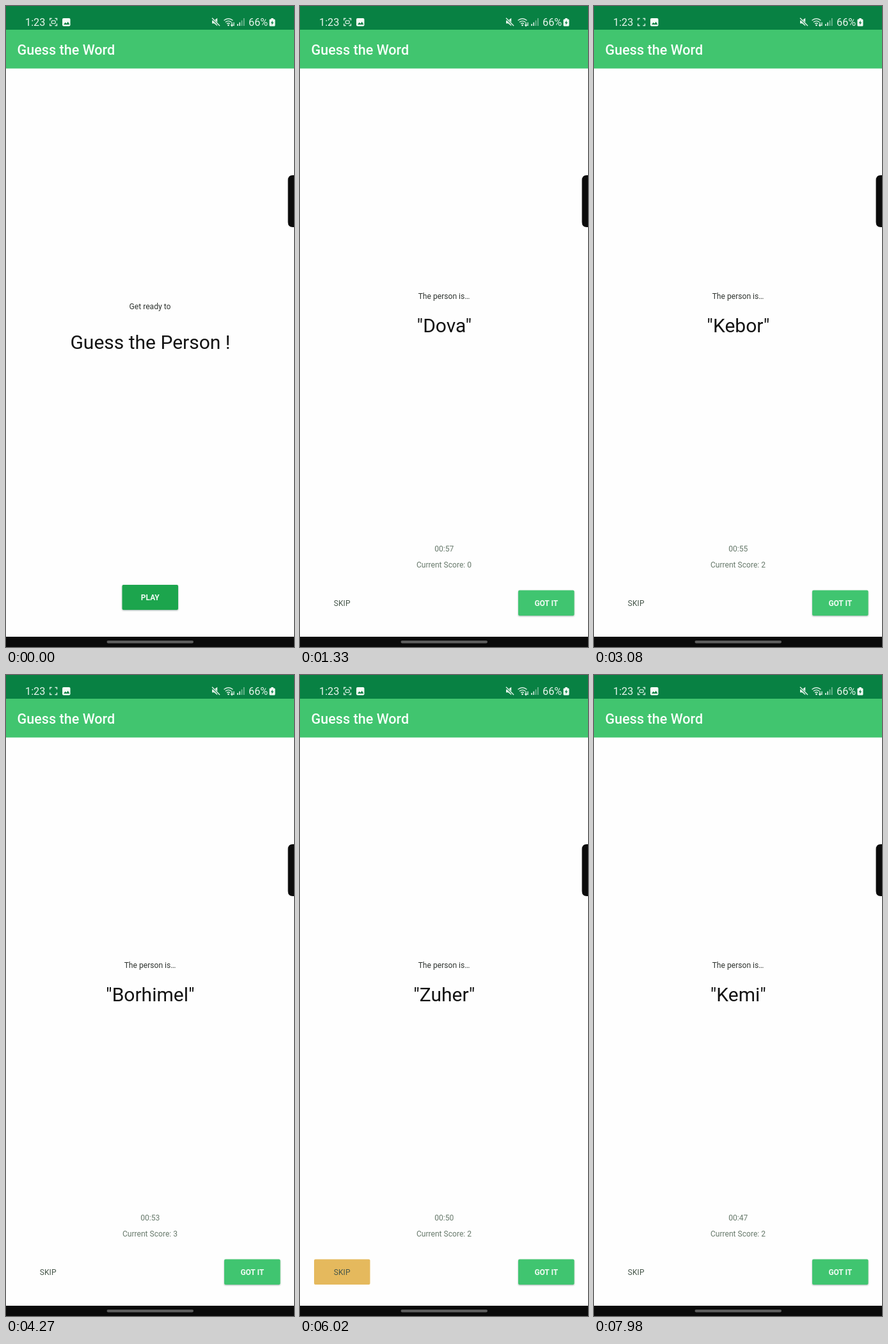
An HTML page that plays this animation: 450 by 1000 pixels, repeating every 8 s.

```html
<!DOCTYPE html>
<html lang="en">
<head>
<meta charset="utf-8">
<title>Guess the Word</title>
<style>
  html, body { margin: 0; width: 100%; height: 100%; overflow: hidden; background: #fefefe; }
  svg { display: block; width: 100%; height: 100%; font-family: Roboto, sans-serif; }
  .mid { text-anchor: middle; }
  .small { font-size: 12.1px; fill: #2e332f; }
  .big { font-size: 30px; fill: #131313; }
  .info { fill: #687a6c; }
  .label { font-size: 12px; font-weight: 700; fill: #effaf2; }
  .status { font-size: 16.3px; fill: #e6f4eb; }
  .line { fill: none; stroke: #d9efe2; }
</style>
</head>
<body>
<svg viewBox="0 0 450 1000">
  <defs>
    <filter id="shadow" x="-10%" y="-10%" width="120%" height="130%">
      <feDropShadow dx="0" dy="1" stdDeviation="0.8" flood-color="#103a20" flood-opacity=".4"/>
    </filter>
  </defs>
  <rect width="450" height="1000" fill="#fefefe"/>
  <rect width="450" height="38" fill="#088143"/>
  <rect y="37" width="450" height="60.5" fill="#41c56f"/>
  <text x="17.5" y="76" font-size="21.6" font-weight="500" fill="#f8fffa">Guess the Word</text>

  <!-- status bar -->
  <text class="status" x="30" y="30.5">1:23</text>
  <path class="line" stroke-width="1.4" d="M68.7 22.5v-3h3M76.5 19.5h3v3M79.5 27.5v3h-3M71.7 30.5h-3v-3"/>
  <g id="recording" class="line" stroke-width="1.3">
    <rect x="71.2" y="22.8" width="6" height="4.6" rx="1.5"/>
  </g>
  <rect x="88" y="19" width="12.5" height="12.5" rx="2" fill="#f2fbf5"/>
  <path d="M90 29l2.7-3.6 1.9 2 2.2-3 2.6 4.6z" fill="#088143"/>
  <path d="M322 22.5h3.2l5-3.8v12.5l-5-4H322z" fill="#e6f4eb"/>
  <path d="M321.5 18.5l12 12.5" stroke="#088143" stroke-width="3"/>
  <path class="line" stroke-width="1.5" d="M322 18.7l12 12.3"/>
  <path class="line" stroke-width="1.4" d="M340.5 22.5q7-5.6 14 0M342.8 25.2q4.8-3.6 9.4 0M345 27.8q2.6-2 5 0M353 25.5v5.5M351.3 29.3l1.7 2 1.7-2M356 31v-5.5"/>
  <circle cx="347.5" cy="30" r="1.3" fill="#e6f4eb"/>
  <path class="line" stroke-width="1.7" d="M362 31v-3M365.2 31v-5.5"/>
  <path class="line" stroke-width="1.7" opacity=".5" d="M368.5 31v-8.5M371.8 31v-12"/>
  <text class="status" x="379" y="30.5">66%</text>
  <path d="M414.3 19h3.4v1.6h1.3q1.5 0 1.5 1.5v8q0 1.5-1.5 1.5h-6q-1.5 0-1.5-1.5v-8q0-1.5 1.5-1.5h1.3z" fill="#f2fbf5"/>
  <path d="M416.7 22.5l-3 4.2h2l-.5 3 3.2-4.2h-2z" fill="#088143"/>

  <g id="titleScreen" class="mid">
    <text class="small" x="225" y="473">Get ready to</text>
    <text class="big" x="225.5" y="534.5">Guess the Person !</text>
    <rect x="181.5" y="903" width="87.5" height="39" rx="2" fill="#1ea54d" filter="url(#shadow)"/>
    <text class="label" x="225.3" y="927.3">PLAY</text>
  </g>

  <g id="gameScreen" class="mid">
    <text class="small" x="225" y="457">The person is…</text>
    <text class="big" id="word" x="225.3" y="509"></text>
    <text class="small info" id="timer" x="225.3" y="850.5"></text>
    <text class="small info" id="score" x="225" y="875.5"></text>
    <rect id="skip" x="22" y="911.5" width="87.5" height="39.5" rx="2" fill="#e5b95d"/>
    <text class="small" x="65.7" y="936" style="fill:#46564a">SKIP</text>
    <rect id="got" x="341" y="911.5" width="87.5" height="39.5" rx="2" filter="url(#shadow)"/>
    <text class="label" x="384.8" y="936">GOT IT</text>
  </g>

  <path d="M450 264h-2q-7.5 0-7.5 8v65q0 8 7.5 8h2z" fill="#0b0b0b"/>
  <rect y="984" width="450" height="16" fill="#0a0a0a"/>
  <rect x="157.5" y="990" width="135.5" height="4.2" rx="2.1" fill="#5c5c5c"/>
</svg>
<script>
  const LOOP = 8000, SECOND = 655;      // one clock second in playback ms
  const GAME_START = 35, FIRST_TICK = 650;
  const BLINK_OFF = 902, BLINK_GAP = 255;
  const WORDS = ["Dova", "Tovan", "Kebor", "Borhimel", "Zuher", "Nelim", "Kemi"];
  const PRESSES = [                     // press, release, score change
    [1610, 1720, 1], [2870, 2980, 1], [4040, 4150, 1],
    [5040, 5150, -1], [5940, 6060, -1], [7060, 7170, 1],
  ];

  const el = id => document.getElementById(id);
  const show = (id, visible) => el(id).style.display = visible ? "" : "none";
  const mod = (a, n) => ((a % n) + n) % n;

  function draw(t) {
    const playing = t >= GAME_START;
    show("titleScreen", !playing);
    show("gameScreen", playing);
    show("recording", mod(t - BLINK_OFF, SECOND) >= BLINK_GAP);

    const done = PRESSES.filter(([, release]) => t >= release);
    const held = PRESSES.find(([press, release]) => t >= press && t < release);
    const change = held ? held[2] : 0;
    const seconds = 58 - Math.floor((t - FIRST_TICK) / SECOND);
    el("word").textContent = `"${WORDS[done.length]}"`;
    el("timer").textContent = "00:" + seconds;
    el("score").textContent = "Current Score: " + done.reduce((sum, press) => sum + press[2], 0);
    show("skip", change < 0);
    el("got").setAttribute("fill", change > 0 ? "#1ea54d" : "#41c56f");
  }

  const start = performance.now();
  function frame() {
    draw((performance.now() - start) % LOOP);
    requestAnimationFrame(frame);
  }
  frame();
</script>
</body>
</html>
```
